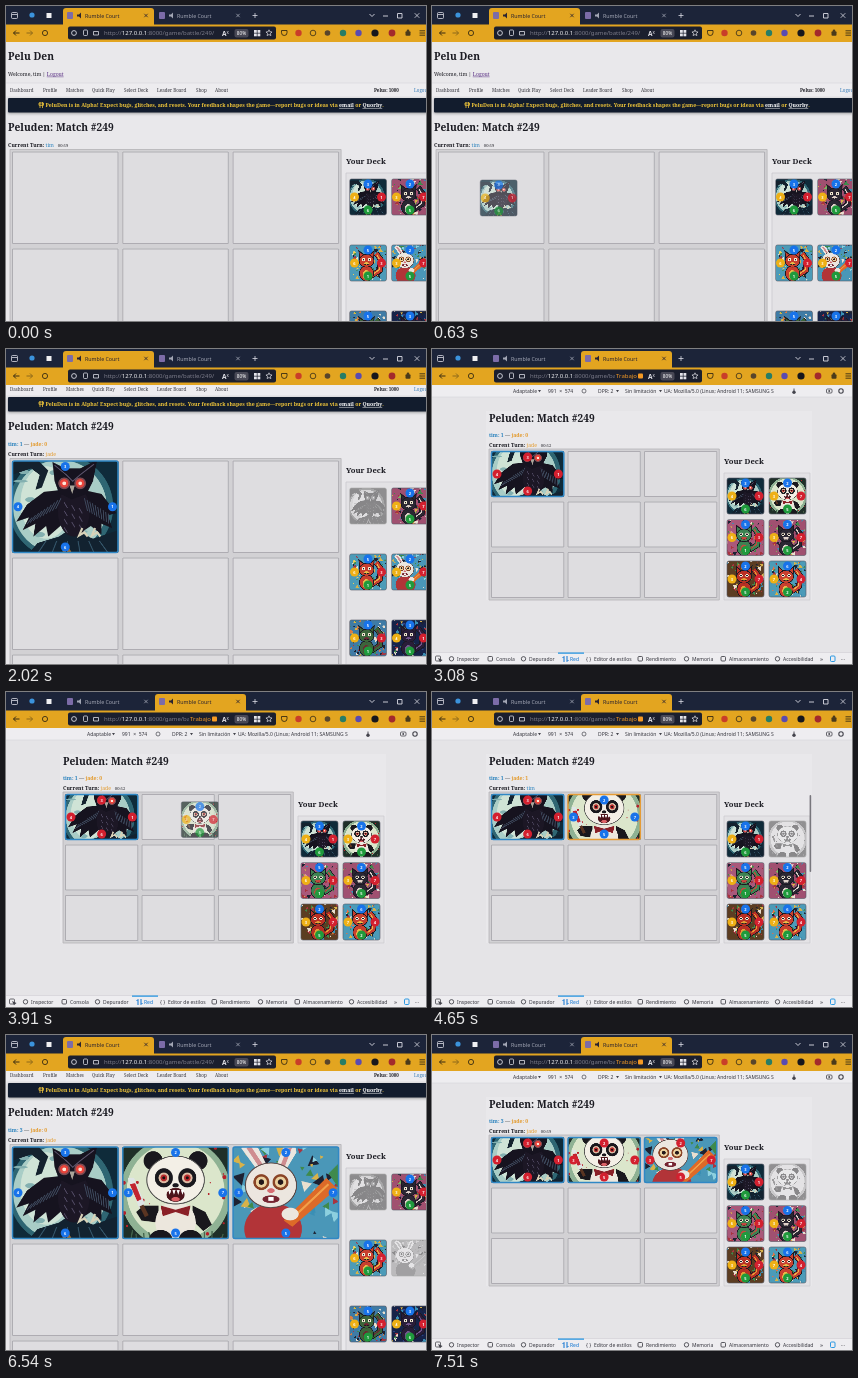
An HTML page with a canvas for the animation above (8000 ms loop, 420x315 px).

```html
<!DOCTYPE html>
<html lang="en">
<head>
<meta charset="utf-8">
<title>Card match</title>
<style>
html, body { margin: 0; width: 100%; height: 100%; overflow: hidden; background: #e8e7ea; }
canvas { display: block; width: 420px; height: 315px; }
</style>
</head>
<body>
<canvas id="stage"></canvas>
<script>
const LOOP = 8000;
const SERIF = '"Noto Serif", serif', SANS = '"Noto Sans", sans-serif';
const NAVY = '#1c2439', GOLD = '#e3a520', INK = '#1b1b22';
const BLUE = '#1873ea', RED = '#d3202f', GREEN = '#1f9a3c', YELLOW = '#eeb016';
const TIM = '#2a82bd', JADE = '#e39a2c';
const stage = document.getElementById('stage');
const dpr = Math.max(1, window.devicePixelRatio || 1);
stage.width = 420 * dpr;
stage.height = 315 * dpr;
const main = stage.getContext('2d');
let c = main;

// ---------- drawing helpers ----------
function rect(x, y, w, h, fill, r = 0) {
  c.fillStyle = fill;
  c.beginPath();
  c.roundRect(x, y, w, h, r);
  c.fill();
}
function frame(x, y, w, h, color, lw = 1, r = 0) {
  c.strokeStyle = color;
  c.lineWidth = lw;
  c.beginPath();
  c.roundRect(x, y, w, h, r);
  c.stroke();
}
function oval(x, y, rx, ry, fill) {
  c.fillStyle = fill;
  c.beginPath();
  c.ellipse(x, y, rx, ry, 0, 0, 7);
  c.fill();
}
const disc = (x, y, r, fill) => oval(x, y, r, r, fill);
function ring(x, y, r, color, lw = 0.9) {
  c.strokeStyle = color;
  c.lineWidth = lw;
  c.beginPath();
  c.arc(x, y, r, 0, 7);
  c.stroke();
}
function path(pts) {
  c.beginPath();
  for (let i = 0; i < pts.length; i += 2) c.lineTo(pts[i], pts[i + 1]);
}
function poly(fill, ...pts) { path(pts); c.fillStyle = fill; c.fill(); }
function line(color, lw, ...pts) {
  path(pts);
  c.strokeStyle = color;
  c.lineWidth = lw;
  c.stroke();
}
function text(s, x, y, size, color = INK, font = SERIF, bold = false, align = 'left') {
  c.font = `${bold ? 'bold ' : ''}${size}px ${font}`;
  c.fillStyle = color;
  c.textAlign = align;
  c.fillText(s, x, y);
  return x + c.measureText(s).width;
}
const bold = (s, x, y, size, color) => text(s, x, y, size, color, SERIF, true);
function linked(s, x, y, size, color, isBold) {
  const end = text(s, x, y, size, color, SERIF, isBold);
  line(color, 0.5, x, y + 1, end, y + 1);
  return end;
}
function cross(x, y, r, color) {
  line(color, 0.8, x - r, y - r, x + r, y + r);
  line(color, 0.8, x - r, y + r, x + r, y - r);
}
function seeded(seed) {
  return () => (seed = (seed * 16807) % 2147483647) / 2147483647;
}
function ease(t, from, to) {
  const p = Math.min(1, Math.max(0, (t - from) / (to - from)));
  return p * p * (3 - 2 * p);
}

// ---------- card art, in a 100 x 100 space ----------
function picture(draw) {
  const cv = document.createElement('canvas');
  cv.width = cv.height = 216;
  c = cv.getContext('2d');
  c.scale(2.16, 2.16);
  draw();
  c = main;
  return cv;
}
function owl() {
  const dark = '#16131f';
  rect(0, 0, 100, 100, '#0f2b3a');
  disc(46, 50, 49, '#2f6673');
  disc(45, 50, 44, '#a9cdc6');
  oval(32, 46, 24, 34, '#cfe3d6');
  const rnd = seeded(9);
  for (let i = 0; i < 16; i++) oval(8 + rnd() * 80, 12 + rnd() * 76, 2 + rnd() * 6, 1 + rnd() * 2, '#83b0b0');
  poly('#14222e', 0, 6, 24, 6, 34, 16, 28, 32, 22, 34, 26, 20, 18, 14, 0, 20);
  poly('#122230', 10, 100, 24, 84, 44, 78, 56, 70, 76, 80, 100, 72, 100, 100);
  for (let i = 0; i < 6; i++) line('#35566a', 1, 20 + i * 15, 100, 32 + i * 10, 82);
  poly('#9d6a31', 44, 100, 51, 84, 60, 100);
  poly('#1a1420', 47, 100, 51, 91, 56, 100);
  // wings, body and tail
  poly(dark, 48, 34, 30, 36, 14, 48, 4, 64, 16, 60, 10, 72, 22, 66, 20, 78, 32, 68, 34, 78, 50, 64);
  poly(dark, 66, 34, 84, 38, 98, 56, 90, 58, 94, 70, 84, 66, 84, 76, 74, 68, 62, 76);
  oval(58, 54, 15, 24, '#1c1725');
  for (let i = 0; i < 10; i++) {
    line('#514a63', 0.9, 49 + i % 3 * 7, 46 + i * 2.6, 52 + i % 3 * 7, 51 + i * 2.6);
    line('#3f4a5e', 0.9, 46 - i * 3, 42 + i * 2, 41 - i * 3, 52 + i * 1.6);
    line('#3f4a5e', 0.9, 68 + i * 2.5, 42 + i * 1.6, 71 + i * 2.2, 54 + i * 1.3);
  }
  // head
  poly(dark, 38, 8, 50, 14, 64, 14, 80, 6, 76, 26, 70, 38, 56, 43, 44, 37, 40, 26);
  line('#575068', 1, 40, 11, 51, 20, 57, 26, 64, 20, 77, 10);
  for (const x of [49, 64]) {
    disc(x, 28, 5.5, '#7d4a52');
    disc(x, 28, 4, '#e8443b');
    disc(x, 28, 1.7, '#ffe5d8');
  }
  poly('#a9a49a', 54, 30, 59, 30, 56.5, 38);
  for (const x of [66, 78]) line('#d8d2b8', 2, x, 70, x - 3, 77, x + 2, 74, x + 5, 78);
}
function panda() {
  const black = '#19181d';
  rect(0, 0, 100, 100, '#1f2f28');
  disc(50, 50, 52, '#8fb294');
  disc(50, 49, 46, '#dbe6cb');
  const rnd = seeded(11);
  for (let i = 0; i < 24; i++) disc(rnd() * 100, 8 + rnd() * 85, 0.5 + rnd() * 1.5, '#b5202a');
  for (let i = 0; i < 16; i++) line('#42624a', 1.2, i * 7, 100, i * 7 + rnd() * 8 - 4, 84 + rnd() * 8);
  poly(black, 34, 62, 20, 62, 13, 68, 18, 76, 34, 78);
  poly(black, 66, 62, 78, 68, 84, 80, 76, 86, 66, 76);
  oval(50, 78, 19, 20, '#ece7dd');
  oval(36, 94, 11, 9, black);
  oval(64, 94, 11, 9, black);
  poly('#8a2027', 36, 62, 50, 66, 64, 62, 62, 72, 50, 68, 38, 72);
  poly('#dfe5e5', 5, 36, 11, 36, 21, 60, 16, 65);
  poly('#c22430', 7, 42, 12, 41, 18, 56, 14, 58);
  line('#5a3522', 4, 18, 62, 23, 72);
  disc(29, 20, 9, black);
  disc(71, 20, 9, black);
  oval(50, 38, 27.5, 23, '#50504f');
  oval(50, 38, 26.5, 22, '#f3efe6');
  for (const x of [39, 61]) {
    oval(x, 36, 8.5, 9, black);
    disc(x, 36, 5, '#ddbba4');
    disc(x, 36, 3.2, '#b82a2b');
    disc(x, 36, 1.4, '#1a1010');
  }
  oval(50, 43, 3, 2, black);
  oval(50, 52, 8.5, 6.5, '#4d141b');
  for (let i = 0; i < 4; i++) poly('#fff', 43 + i * 4, 47.5, 46 + i * 4, 47.5, 44.5 + i * 4, 52);
  oval(50, 56, 4, 2, '#dc6267');
}
function burst(sky, glow, seed) {
  const rnd = seeded(seed), hues = [glow, '#a9343f', '#3a8fb5', '#d8b249', '#3f8a4c', '#1d2233', '#e9dfcf'];
  rect(0, 0, 100, 100, sky);
  for (let i = 0; i < 70; i++) {
    const x = rnd() * 100, y = rnd() * 100, r = 3 + rnd() * 10, a = rnd() * 6;
    poly(hues[i % 7], x, y, x + r * Math.cos(a), y + r * Math.sin(a), x + r * Math.cos(a + 1), y + r * Math.sin(a + 1));
  }
}
function bunny() {
  const fur = '#ece6df', pink = '#cf8d90';
  burst('#4a97b8', '#8dd0df', 5);
  poly(fur, 24, 30, 8, 8, 14, 2, 24, 8, 34, 28);
  poly(fur, 40, 28, 48, 6, 58, 2, 60, 12, 48, 32);
  poly(pink, 25, 26, 13, 8, 17, 6, 30, 26);
  poly(pink, 44, 27, 51, 9, 56, 7, 48, 28);
  oval(38, 84, 27, 24, '#b23438');
  poly('#3f8a4c', 90, 32, 100, 22, 100, 46);
  poly('#dd6a28', 48, 76, 88, 36, 98, 46, 56, 82);
  line('#f2a04a', 2, 56, 74, 90, 42);
  oval(36, 43, 24.5, 21.5, '#5b4a48');
  oval(36, 43, 23.5, 20.5, fur);
  for (const x of [27, 45]) {
    disc(x, 40, 7.5, '#8a4426');
    disc(x, 40, 5.2, '#ecd2a0');
    disc(x, 40, 2.6, '#23171a');
  }
  oval(36, 48, 3.5, 2.2, '#d76b72');
  oval(36, 56, 8, 3.6, '#762430');
  rect(33.5, 54, 5, 3.5, '#fff');
  oval(54, 70, 8, 6, fur);
}
const critter = (sky, glow, fur, belly, seed) => () => {
  const ink = '#1c1822';
  burst(sky, glow, seed);
  line(ink, 15, 60, 84, 82, 70, 84, 40, 72, 24);
  line(fur, 11, 60, 84, 82, 70, 84, 40, 72, 24);
  line(belly, 3, 64, 80, 80, 68, 82, 42, 74, 28);
  oval(46, 78, 20, 22, ink);
  oval(46, 78, 18, 20, fur);
  oval(45, 82, 9, 13, belly);
  poly(ink, 26, 44, 24, 14, 38, 26, 54, 26, 68, 14, 66, 44);
  poly(fur, 28, 44, 27, 20, 38, 29, 54, 29, 65, 20, 64, 44);
  oval(46, 44, 21, 18, ink);
  oval(46, 44, 19, 16, fur);
  for (const x of [38, 54]) {
    disc(x, 41, 4.5, '#f4ecd4');
    disc(x, 41, 2.2, ink);
  }
  oval(46, 52, 8, 4, belly);
  line(ink, 1.4, 38, 53, 46, 55, 54, 53);
};
const art = {
  owl: picture(owl),
  panda: picture(panda),
  bunny: picture(bunny),
  skunk: picture(critter('#a05070', '#7bb661', '#2b2733', '#e0d2ca', 21)),
  parrot: picture(critter('#4c9bb8', '#f0cf59', '#c9402f', '#eabb48', 31)),
  goblin: picture(critter('#3f7ba5', '#db7d42', '#3c653b', '#6b2733', 41)),
  cat: picture(critter('#162349', '#304284', '#291d39', '#72568c', 51)),
  lizard: picture(critter('#a9587a', '#d990a0', '#3d8252', '#c4473e', 61)),
  devil: picture(critter('#5c3d22', '#d9702b', '#b93024', '#e69f35', 71)),
  bird: picture(critter('#4c9bb8', '#e97044', '#c9402f', '#eabb48', 31))
};
function cover(img, x, y, w, h, r) {
  const k = img.width / Math.max(w, h), sw = w * k, sh = h * k;
  c.save();
  c.beginPath();
  c.roundRect(x, y, w, h, r);
  c.clip();
  c.drawImage(img, (img.width - sw) / 2, (img.height - sh) / 2, sw, sh, x, y, w, h);
  c.restore();
}
function dots(name, x, y, w, h, inset, colors) {
  const n = name.length, mx = x + w / 2, my = y + h / 2;
  const spots = [[mx, y + inset], [x + w - inset, my], [mx, y + h - inset], [x + inset, my]];
  spots.forEach(([px, py], i) => {
    disc(px, py, 4.5, colors[i]);
    text((n * 3 + i * 5) % 7 + 1, px, py + 1.5, 4, '#fff', SANS, true, 'center');
  });
}

// ---------- game pieces ----------
function deckCard(name, x, y, used) {
  if (used) c.filter = 'grayscale(1) opacity(0.45)';
  cover(art[name], x, y, 37, 36, 2);
  c.filter = 'none';
  if (used) return frame(x, y, 37, 36, '#aaa', 0.6, 2);
  frame(x, y, 37, 36, '#555a66', 0.6, 2);
  dots(name, x, y, 37, 36, 5, [BLUE, RED, GREEN, YELLOW]);
}
function deck(names, used, x, y, pitchX, pitchY) {
  names.forEach((n, i) => deckCard(n, x + i % 2 * pitchX, y + (i >> 1) * pitchY, used.includes(n)));
}
function board(x, y, w, h, pitchX, pitchY, cards, viewer) {
  rect(x - 2, y - 2, pitchX * 2 + w + 4, pitchY * 2 + h + 4, '#d2d1d4');
  frame(x - 2, y - 2, pitchX * 2 + w + 4, pitchY * 2 + h + 4, '#b4b3b7', 0.8);
  for (let i = 0; i < 9; i++) {
    const cx = x + i % 3 * pitchX, cy = y + (i / 3 | 0) * pitchY, card = cards[i];
    rect(cx, cy, w, h, '#dedde0');
    frame(cx + 0.5, cy + 0.5, w - 1, h - 1, '#a9a8ad', 0.9);
    if (!card) continue;
    cover(art[card.name], cx, cy, w, h, 2);
    frame(cx + 0.5, cy + 0.5, w - 1, h - 1, card.owner === 'tim' ? '#3088c5' : '#e59b35', 1.5, 2);
    dots(card.name, cx, cy, w, h, 6, Array(4).fill(card.owner === viewer ? BLUE : RED));
  }
}
function status(x, y, g, clock) {
  if (g.cards.length) {
    let e = bold(`tim: ${g.tim}`, x, y, 5.12, TIM);
    e = bold(' — ', e, y, 5.12, '#555');
    bold(`jade: ${g.jade}`, e, y, 5.12, JADE);
    y += 10;
  }
  const e = bold('Current Turn: ', x, y, 5.12);
  const end = text(g.turn, e, y, 5.12, g.turn === 'tim' ? TIM : JADE);
  if (clock) text('00:' + clock, end + 4, y, 4.1);
}
function ghost(name, t, from, to, x0, y0, x1, y1) {
  if (t < from || t >= to) return;
  const p = ease(t, from, to - 110);
  c.globalAlpha = 0.7;
  deckCard(name, x0 + (x1 - x0) * p, y0 + (y1 - y0) * p);
  c.globalAlpha = 1;
}
function game(t) {
  const cards = [];
  if (t >= 800) cards.push({ name: 'owl', owner: 'tim' });
  if (t >= 4170) cards.push({ name: 'panda', owner: t < 6540 ? 'jade' : 'tim' });
  if (t >= 6540) cards.push({ name: 'bunny', owner: 'tim' });
  const tim = cards.filter(k => k.owner === 'tim').length;
  return { cards, tim, jade: cards.length - tim, turn: cards.length % 2 ? 'jade' : 'tim' };
}

// ---------- browser ----------
function tab(x, active) {
  if (active) rect(x, 2, 91, 17, GOLD, [3, 3, 0, 0]);
  const ink = active ? '#2a2330' : '#a3a7b5';
  rect(x + 4, 6, 6, 7, '#7c6ca8', 1);
  poly(ink, x + 14, 8.5, x + 16, 8.5, x + 18, 6.5, x + 18, 12.5, x + 16, 10.5, x + 14, 10.5);
  text('Rumble Court', x + 22, 11.6, 5.3, ink, SANS);
  cross(x + 83, 9.5, 1.7, ink);
}
function star(x, y) {
  const pts = [];
  for (let i = 0; i <= 10; i++) {
    const a = i * Math.PI / 5 - Math.PI / 2, r = i % 2 ? 1.5 : 3.2;
    pts.push(x + r * Math.cos(a), y + r * Math.sin(a));
  }
  line('#e4e4ea', 0.7, ...pts);
}
function chrome(second) {
  const pale = '#d9dae2', brown = '#3a2d12';
  rect(0, 0, 420, 19, NAVY);
  frame(5.5, 6.5, 6, 6, pale, 0.8, 1);
  line(pale, 0.8, 6, 8.5, 11, 8.5);
  disc(26, 9, 2.6, '#3b93dc');
  rect(40.5, 7, 5, 5, '#f0f0f2');
  tab(57, !second);
  tab(149, second);
  line(pale, 0.8, 246.5, 9.5, 251.5, 9.5);
  line(pale, 0.8, 249, 7, 249, 12);
  line(pale, 0.9, 363.5, 8, 366, 10.5, 368.5, 8);
  line(pale, 0.9, 377, 10, 382, 10);
  frame(391.5, 7.5, 4.5, 4.5, pale, 0.9);
  cross(411, 9.5, 2.3, pale);

  rect(0, 18.5, 420, 17.5, GOLD);
  line(brown, 1, 10, 24.5, 7.5, 27, 10, 29.5);
  line(brown, 1, 7.5, 27, 13.5, 27);
  line('#8d691a', 1, 24, 24.5, 26.5, 27, 24, 29.5);
  line('#8d691a', 1, 20.5, 27, 26.5, 27);
  ring(39, 27, 2.6, brown);
  rect(62, 20.5, 208, 13, '#1b1f2e', 2);
  ring(68, 27, 2.4, pale);
  frame(77.5, 24, 4, 5.5, pale, 0.8, 1);
  frame(87.5, 25.5, 5, 3.5, pale, 0.8);
  let e = text('http://', 98, 29.2, 6, '#7c7c8a', SANS);
  e = text('127.0.0.1', e, 29.2, 6, '#f4f4f6', SANS);
  text(second ? ':8000/game/ba' : ':8000/game/battle/249/', e, 29.2, 6, '#7c7c8a', SANS);
  if (second) {
    rect(183, 22, 45, 10, '#1b1f2e');
    text('Trabajo', 184, 29.2, 6, '#f59a25', SANS);
    rect(206, 24.5, 5, 5, '#f59a25', 1);
  }
  text('A', 216, 30, 6.5, '#e4e4ea', SANS, true);
  text('x', 220.5, 28, 4.5, '#e4e4ea', SANS);
  rect(228.5, 23, 14, 8.5, '#484855', 2);
  text('80%', 235.5, 29, 4.8, '#fff', SANS, false, 'center');
  for (let i = 0; i < 4; i++) rect(248 + i % 2 * 3.5, 24 + (i >> 1) * 3.5, 2.8, 2.8, '#e4e4ea');
  star(263, 27);

  frame(275.5, 24.5, 5.5, 5, brown, 0.9, [0, 0, 3, 3]);
  disc(292.5, 27, 3.2, '#c93e29');
  ring(307, 27, 2.8, '#4a3a1a');
  disc(321.5, 27, 2.8, '#58452b');
  disc(337, 27, 3.2, '#287d65');
  disc(352.5, 27, 3.2, '#5a4bb0');
  disc(369, 27, 3.6, '#17171c');
  disc(386, 27, 3.4, '#a32a2c');
  rect(399.5, 25.2, 5, 4.5, '#4a3a1a', 1);
  disc(402, 24.8, 1.3, '#4a3a1a');
  for (let i = 0; i < 3; i++) line(brown, 0.9, 413.5, 24.8 + i * 2.2, 419, 24.8 + i * 2.2);
}

// ---------- first tab: wide page ----------
function widePage(t, g) {
  const top = 44 * ease(t, 1810, 2010);
  rect(0, 36, 420, 279, '#e9e8eb');
  c.save();
  c.translate(0, -top);
  bold('Pelu Den', 2, 54, 10.24);
  let e = text('Welcome, tim | ', 2, 69.8, 5.12);
  linked('Logout', e, 69.8, 5.12, '#5b3285');
  rect(0, 77, 420, 13, '#edecef');
  line('#d6d5da', 0.6, 0, 77, 420, 77);
  [['Dashboard', 4], ['Profile', 37], ['Matches', 60], ['Quick Play', 86], ['Select Deck', 118],
   ['Leader Board', 151], ['Shop', 190], ['About', 209]].forEach(([s, x]) => text(s, x, 85.6, 4.5, '#33333b'));
  bold('Pelus: 1000', 368, 85.6, 4.5);
  text('Logout', 408, 85.6, 4.5, '#3279b5');

  c.shadowColor = 'rgba(0,0,0,.35)';
  c.shadowBlur = 3 * dpr;
  c.shadowOffsetY = dpr;
  rect(2, 92, 420, 14.5, '#121c2d', 1);
  c.shadowColor = 'transparent';
  const warn = '#efc53a';
  frame(33, 97, 4.5, 2.3, warn, 0.8);
  line(warn, 0.8, 34, 96, 34, 102);
  line(warn, 0.8, 36.5, 96, 36.5, 102);
  e = bold('PeluDen is in Alpha! Expect bugs, glitches, and resets. Your feedback shapes the game—report bugs or ideas via ', 39.5, 101.4, 5.2, warn);
  e = linked('email', e, 101.4, 5.2, '#fff', true);
  e = bold(' or ', e, 101.4, 5.2, warn);
  e = linked('Quorby', e, 101.4, 5.2, '#fff', true);
  bold('.', e, 101.4, 5.2, warn);

  bold('Peluden: Match #249', 2, 124.8, 10.24);
  const clock = t < 2730 ? 59 : 54 - Math.floor((t - 5190) / 1000);
  status(2, 141, g, g.turn === 'tim' ? clock : 0);
  if (g.cards.length) c.translate(0, 10);
  board(6, 145.5, 106.5, 92.5, 110.3, 97, g.cards, 'tim');
  bold('Your Deck', 340, 158, 7.68);
  rect(340, 167, 82, 220, '#e3e2e5');
  frame(340, 167, 82, 220, '#c6c5ca', 0.7);
  const used = g.cards.map(k => k.name);
  deck(['owl', 'skunk', 'parrot', 'bunny', 'goblin', 'cat'], used, 343.5, 173, 42, 66);
  ghost('owl', t, 50, 800, 343.5, 173, 41, 174);
  ghost('bunny', t, 5940, 6540, 385.5, 239, 261, 174);
  c.restore();
}

// ---------- second tab: device preview ----------
function devicePage(t, g) {
  const grey = '#44444c';
  rect(0, 36, 420, 279, '#e5e4e7');
  rect(0, 36, 420, 12, '#eeedf0');
  line('#d5d4d9', 0.6, 0, 48, 420, 48);
  const ui = (s, x, y, color = '#34343c', size = 5) => text(s, x, y, size, color, SANS);
  const arrow = x => poly(grey, x, 41, x + 3, 41, x + 1.5, 43.2);
  ui('Adaptable', 81, 43.8);
  arrow(106);
  ui('991  ×  574', 116, 43.8);
  ring(152, 42, 2, grey, 0.7);
  ui('DPR: 2', 166, 43.8);
  arrow(184);
  ui('Sin limitación', 193, 43.8);
  arrow(227);
  ui('UA: Mozilla/5.0 (Linux; Android 11; SAMSUNG S', 232, 43.8);
  line(grey, 0.9, 362, 39.5, 362, 43);
  disc(362, 43.2, 1.7, grey);
  frame(394.5, 40, 5.5, 4, grey, 0.8, 1);
  disc(397.2, 42, 0.9, grey);
  ring(409, 42, 2.2, grey, 1.1);

  rect(54, 62, 326, 189, '#e9e8eb');
  bold('Peluden: Match #249', 57, 72.8, 10.24);
  const clock = t < 5190 ? 52 : 59;
  status(57, 88, g, g.turn === 'jade' ? clock : 0);
  board(59, 102, 73.3, 46, 76.5, 50.5, g.cards, 'jade');
  bold('Your Deck', 292, 115, 7.68);
  rect(292, 124, 86, 127, '#e3e2e5');
  frame(292, 124, 86, 127, '#cac9cd', 0.7);
  deck(['owl', 'panda', 'lizard', 'skunk', 'devil', 'bird'], t >= 4170 ? ['panda'] : [], 295, 129, 42, 41.5);
  if (t >= 4340 && t < 5190) rect(377.6, 103, 1.6, 77, '#77767c', 0.8);
  ghost('panda', t, 3360, 4170, 337, 129, 154, 107);

  rect(0, 303.5, 420, 11.5, '#eeedf0');
  line('#d0cfd4', 0.6, 0, 303.5, 420, 303.5);
  rect(126, 303.5, 26, 1.2, '#168fe0');
  frame(3.5, 307, 5, 5, grey, 0.8, 1);
  poly(grey, 6, 309, 10.5, 311, 8, 313.2);
  [['Inspector', 25], ['Consola', 64], ['Depurador', 97], ['Red', 138], ['Editor de estilos', 162], ['Rendimiento', 214],
   ['Memoria', 260], ['Almacenamiento', 297], ['Accesibilidad', 351]].forEach(([s, x], i) => {
    const on = s === 'Red', color = on ? '#0c72d0' : '#34343c';
    ui(s, x, 311.8, color);
    if (on) {
      line(color, 1, x - 6, 313, x - 6, 307.5, x - 7.5, 309);
      line(color, 1, x - 3, 307, x - 3, 312.5, x - 1.5, 311);
    } else if (s[0] === 'E') {
      ui('{ }', x - 8, 311.5);
    } else if (i % 2) {
      frame(x - 8, 307.5, 4.5, 4.5, color, 0.8, 1);
    } else {
      ring(x - 5.5, 309.8, 2.2, color, 0.8);
    }
  });
  ui('»', 388, 312, '#34343c', 6);
  frame(398.5, 307, 4.5, 5.5, '#168fe0', 0.9, 1);
  ui('···', 409, 311.8);
}

const start = performance.now();
function draw() {
  const t = (performance.now() - start) % LOOP, g = game(t);
  const second = (t >= 2730 && t < 5190) || t >= 7510;
  c.setTransform(dpr, 0, 0, dpr, 0, 0);
  (second ? devicePage : widePage)(t, g);
  chrome(second);
  requestAnimationFrame(draw);
}
draw();
</script>
</body>
</html>
```
